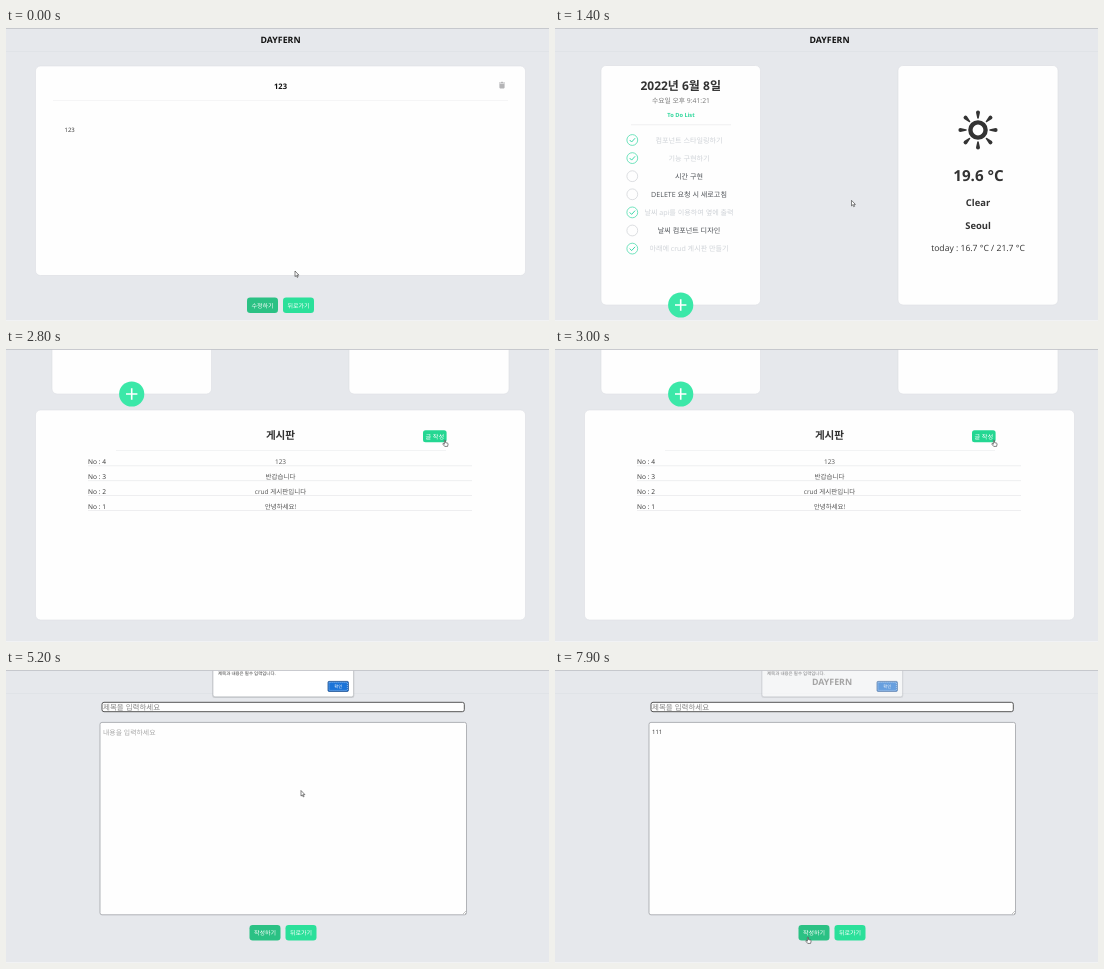
An HTML page for the animation above (8000 ms loop, 543x293 px).

```html
<!DOCTYPE html>
<html lang="ko">
<head>
<meta charset="utf-8">
<title>Daily board</title>
<style>
html, body { margin: 0; height: 100%; overflow: hidden; background: #e6e8ec; }
svg { display: block; width: 100vw; height: 100vh; }
text { font-family: "Open Sans", "Noto Sans CJK KR", sans-serif; text-rendering: geometricPrecision; white-space: pre; }
</style>
</head>
<body>
<svg id="stage" viewBox="0 0 543 293"></svg>
<script>
const LOOP = 8000, STEP = 100;
const GREEN = '#2be09a', DARK_GREEN = '#2bc184', INK = '#333';

// Markup helpers
const text = (x, y, size, str, fill = INK, weight = 400, anchor = 'middle') =>
  `<text x="${x}" y="${y}" font-size="${size}" fill="${fill}" font-weight="${weight}" text-anchor="${anchor}">${str}</text>`;
const rect = (x, y, w, h, r, fill, extra = '') =>
  `<rect x="${x}" y="${y}" width="${w}" height="${h}" rx="${r}" fill="${fill}" ${extra}/>`;
const card = (x, y, w, h) => rect(x, y, w, h, 5, '#fefefe', 'stroke="#dcdee3" stroke-width=".6"');
const rule = (x1, x2, y, color) => rect(x1, y, x2 - x1, .7, 0, color);
const button = (x, y, label, fill) =>
  rect(x, y, 31, 15.5, 3.2, fill) + text(x + 15.5, y + 10, 6, label, '#fff');
const header = x => rule(0, 543, 23, '#dfe1e6') + text(x, 15, 8.8, 'DAYFERN', '#111', 700);
const group = (id, body) => `<g id="${id}">${body}</g>`;

const detailPage = header(274.5) + card(29.5, 38, 490, 209.5) +
  text(274.5, 60.8, 7.6, '123', '#111', 700) + rule(47, 502, 72, '#f2f2f4') +
  text(58.5, 104.3, 6, '123', INK, 400, 'start') +
  '<path d="M493 54.6h1.9l.4-.8h1.4l.4.8h1.9v.9h-6zM493.4 56h5.2v3.6q0 .8-.8.8h-3.6q-.8 0-.8-.8z" fill="#b4b4b6"/>' +
  button(241, 269.5, '수정하기', DARK_GREEN) + button(277, 269.5, '뒤로가기', GREEN);

const todos = [
  ['컴포넌트 스타일링하기', 1], ['기능 구현하기', 1], ['시간 구현', 0],
  ['DELETE 요청 시 새로고침', 0], ['날씨 api를 이용하여 옆에 출력', 1],
  ['날씨 컴포넌트 디자인', 0], ['아래에 crud 게시판 만들기', 1]
].map(([label, done], i) => {
  const y = 112 + i * 18.1;
  return `<circle cx="77.3" cy="${y}" r="5.4" fill="none" stroke="${done ? '#4fdcae' : '#d3d6da'}" stroke-width=".8"/>` +
    (done ? `<path d="M74.7 ${y}l1.9 2 3.5-3.8" fill="none" stroke="#38d9a9" stroke-width="1"/>` : '') +
    text(134, y + 2.6, 7.1, label, done ? '#ced2d7' : '#4d5156');
}).join('');

const rays = [...Array(8).keys()].map(i =>
  `<path transform="rotate(${i * 45})" d="M-.8-12L-2-17.6A2 2 0 0 1 2-17.6L.8-12A.8.8 0 0 1-.8-12Z" fill="${INK}"/>`).join('');

const posts = ['123', '반갑습니다', 'crud 게시판입니다', '안녕하세요!'].map((label, i) => {
  const y = 346.9 + i * 14.9;
  return text(82, y, 6.6, 'No : ' + (4 - i), INK, 400, 'start') +
    text(274.5, y, 6.5, label, '#555') + rule(82, 466, y + 1.6, '#e8e9eb');
}).join('');

const homePage = header(274.5) + card(46, 37.5, 159.5, 239.5) +
  text(125.7, 62.3, 12, '2022년 6월 8일', INK, 700) +
  text(126, 74.8, 6.8, '수요일 오후 9:41:21', '#777') +
  text(126, 89, 5.7, 'To Do List', '#2fd79c', 700) + rule(76, 176, 96.5, '#e9eaec') + todos +
  card(343, 37.5, 160, 239.5) +
  `<g transform="translate(423 102)"><circle r="7.6" fill="none" stroke="${INK}" stroke-width="4.4"/>${rays}</g>` +
  text(423.5, 153.3, 15.2, '19.6 °C', INK, 700) + text(423, 177.7, 9.4, 'Clear', INK, 700) +
  text(423, 201.2, 9.4, 'Seoul', INK, 700) + text(423, 223.4, 8.6, 'today : 16.7 °C / 21.7 °C') +
  card(29.5, 293, 490, 210) +
  '<circle cx="125.7" cy="277" r="12.6" fill="#3be8a8"/><path d="M120 277h11.4M125.7 271.3v11.4" stroke="#fff" stroke-width="1.6"/>' +
  text(274.5, 322, 10.6, '게시판', INK, 700) + rect(417, 313.2, 23.6, 12, 2.5, '#24d792') +
  text(428.8, 321.5, 6.2, '글 작성', '#fff') + rule(110, 440, 333, '#eeeff1') + posts;

const writePage = header(277) +
  rect(96, 32.3, 362.3, 9.4, 2, '#fefefe', 'stroke="#555" stroke-width="1"') +
  text(97, 39.6, 7.5, '제목을 입력하세요', '#858585', 400, 'start') +
  rect(94, 52.4, 366.5, 192.4, 2, '#fefefe', 'stroke="#a0a2a8" stroke-width=".8"') +
  '<path d="M457 244l3-3M459 244l1-1" stroke="#888" stroke-width=".5"/>' +
  group('hint', text(97, 64.5, 6.9, '내용을 입력하세요', '#a8a8a8', 400, 'start')) +
  '<text id="typed" x="97" y="64.3" font-size="6" fill="#333"></text>' +
  '<rect id="caret" y="58.5" width=".6" height="7" fill="#333"/>' +
  button(243.5, 255, '작성하기', DARK_GREEN) + button(279.5, 255, '뒤로가기', GREEN);

const alertBox =
  rect(206.3, -5, 142, 33, 2.5, '#000', 'opacity=".12"') +
  rect(207, -5, 140.5, 31.8, 2, '#fff', 'stroke="#b8babf" stroke-width=".6"') +
  text(212, 4.8, 4.45, '제목과 내용은 필수 입력입니다.', INK, 400, 'start') +
  rect(322, 11.4, 20.4, 10, 1, '#1a73d8', 'stroke="#1d4f8c" stroke-width=".8"') +
  rect(323, 12.4, 18.4, 8, .6, 'none', 'stroke="#fff" stroke-width=".5" stroke-dasharray="1 1"') +
  text(332.2, 18, 4.3, '확인', '#fff');

const pointers = {
  arrow: '<path d="M0 0v5.6l1.3-1.2.9 2 .9-.4-.9-1.9h1.7z"/>',
  hand: '<path d="M-.6.4q.6-.7 1.1 0v2.2l2 .5q.7.2.6 1l-.5 2.3h-2.9l-2-2.4q.1-.8.9-.4l.8.6z"/>',
  beam: '<path d="M-1-3h2M0-3v6M-1 3h2"/>'
};

const stage = document.getElementById('stage');
stage.innerHTML = group('detail', detailPage) + group('home', homePage) + group('write', writePage) +
  group('alert', alertBox) + rect(0, 0, 543, .9, 0, '#c3c5ca') + rect(0, 292, 543, 1, 0, '#f1f2f4') +
  '<g id="pointer" fill="#fff" stroke="#333" stroke-width=".6" stroke-linejoin="round">' +
  Object.entries(pointers).map(([id, body]) => group(id, body)).join('') + '</g>';
const el = id => document.getElementById(id);
const show = (id, on) => el(id).setAttribute('display', on ? 'inline' : 'none');

// Keys are [time, ...values], joined by straight lines
const scrollKeys = [[1400, 0], [1500, 60], [1600, 148], [1700, 204], [1800, 230], [1900, 232]];
const alertKeys = [[4300, 0], [4400, .62], [4500, 1], [5600, 1], [5700, .4], [5800, 0], [7800, 0], [7900, .62]];
const pointerKeys = [
  [0, 289, 243], [500, 291, 276], [800, 291, 276], [1200, 296.5, 172], [1800, 296.5, 173],
  [2700, 439, 91], [3100, 439, 91], [3600, 211, 240], [3800, 274, 274], [3900, 274, 274],
  [4000, 259, 267], [4400, 259, 267], [5000, 282, 155], [5100, 282, 155], [5500, 334, 17],
  [5700, 334, 17], [6300, 223, 44], [6500, 195, 48], [6800, 130, 70], [7200, 130, 70],
  [7400, 262, 238], [7600, 253, 267]
];

function sample(keys, t) {
  if (t <= keys[0][0]) return keys[0].slice(1);
  const next = keys.findIndex(k => k[0] > t);
  if (next < 0) return keys[keys.length - 1].slice(1);
  const a = keys[next - 1], b = keys[next], p = (t - a[0]) / (b[0] - a[0]);
  return a.slice(1).map((v, i) => v + (b[i + 1] - v) * p);
}

const inside = (x, y, [l, t, r, b]) => x >= l && x <= r && y >= t && y <= b;
const buttons = {
  detail: [[241, 269, 272, 285], [277, 269, 308, 285]],
  home: [[417, 81, 441, 93]],
  write: [[243, 255, 275, 271], [279, 255, 311, 271]]
};
const fields = [[96, 32, 458, 42], [94, 52, 460, 245]];

function draw(now) {
  const t = Math.floor(now % LOOP / STEP) * STEP;
  const page = t < 800 ? 'detail' : t < 3100 ? 'home' : 'write';
  for (const id in buttons) show(id, id === page);

  const [scroll] = sample(scrollKeys, t);
  el('home').setAttribute('transform', `translate(0 ${-scroll})`);

  const count = Math.max(0, Math.min(3, Math.floor((t - 6900) / 100)));
  el('typed').textContent = '1'.repeat(count);
  show('hint', !count);
  show('caret', t >= 6900 && t < 7500);
  el('caret').setAttribute('x', 97.2 + count * 3.43);

  const [alpha] = sample(alertKeys, t);
  el('alert').setAttribute('opacity', alpha);

  const [x, y] = sample(pointerKeys, t);
  const hit = areas => areas.some(area => inside(x, y, area));
  const kind = hit(buttons[page]) ? 'hand'
    : page === 'write' && alpha === 0 && hit(fields) ? 'beam' : 'arrow';
  for (const id in pointers) show(id, id === kind);
  el('pointer').setAttribute('transform', `translate(${x} ${y})`);
  requestAnimationFrame(tick);
}

const start = performance.now();
const tick = () => draw(performance.now() - start);
tick();
</script>
</body>
</html>
```
